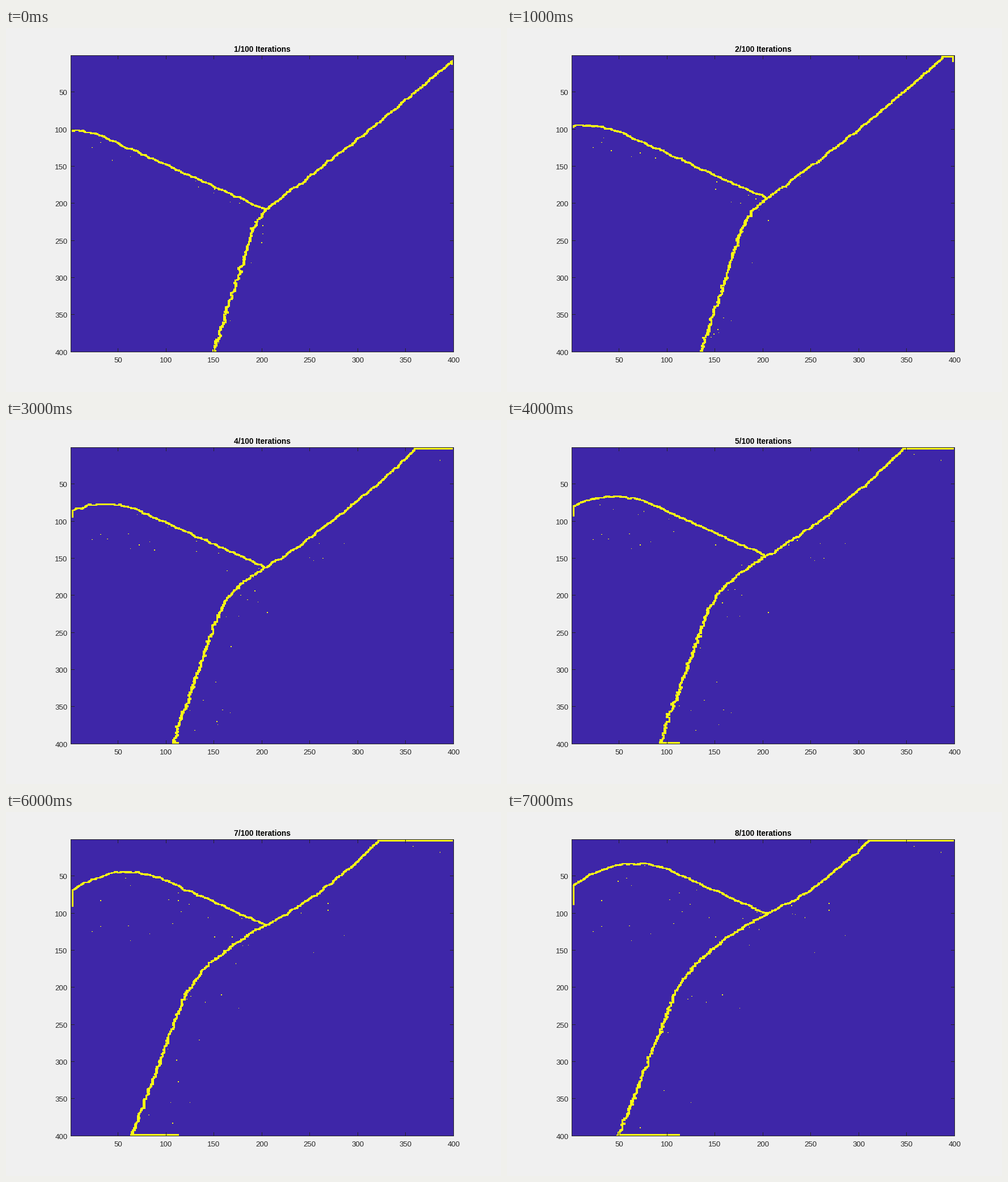
These frames come from a looping animation (873x641 px, 8000 ms). A matplotlib script:

```python
import numpy as np
import matplotlib.pyplot as plt
from matplotlib.animation import FuncAnimation
from matplotlib.colors import ListedColormap

W, H, DPI = 873, 641, 100
X0, X1, Y0, Y1 = 114, 790, 48, 571    # image area in pixels
N, STEPS = 400, 8
CW, CH = (X1 - X0) / N, (Y1 - Y0) / N
PX = X0 + (np.arange(N) + 0.5) * CW
PY = Y0 + (np.arange(N) + 0.5) * CH
INK = "#262626"

plt.rcParams["font.family"] = "Liberation Sans"

# Specks that stay for good: x, y and the iteration they appear in.
LASTING = [(168, 201, 1), (219, 226, 1), (216, 200, 3), (254, 215, 3),
           (596, 217, 3), (766, 71, 3), (294, 197, 5), (718, 60, 5)]


def col(x):
    return int(np.clip((x - X0) / CW, 0, N - 1))


def row(y):
    return int(np.clip((y - Y0) / CH, 0, N - 1))


def wobble(rng, amp, run):
    noise = rng.normal(size=N)
    return amp * np.convolve(noise, np.ones(run) / np.sqrt(run), "same")


def upper_edge(it, jx, jy, rng):
    """Height of the top grain's border in each column."""
    # Left arm: a straight slope that bends down near the rim.
    reach = 63 * np.sqrt(it)
    bend = np.maximum(0, reach - (PX - 117))
    left = jy - 0.45 * (jx - PX) + 0.0033 * bend ** 2

    # Right arm: slightly sagging, ending on the top rim.
    end = 823.4 - 26.86 * it + 0.476 * it ** 2
    s = np.clip((PX - jx) / (end - jx), 0, 1)
    sag = 13 * (1 - np.exp(-it / 2))
    right = jy + (50 - jy) * s + 4 * sag * s * (1 - s)

    arm = np.where(PX < jx, left + wobble(rng, 0.8, 5),
                   right + wobble(rng, 1.1, 5) * (s < 1))
    return np.maximum(arm, 50.6)


def lower_edge(it, jx, jy, rng):
    """Horizontal place of the border between the two lower grains."""
    foot = 391.5 - 24.3 * it
    slope = 0.31 + 0.011 * it
    bend = np.clip(1 - (PY - jy) / (20 + 16 * it), 0, 1) ** 2
    lift = jx - foot - slope * (569 - jy)
    x = foot + slope * (569 - PY) + lift * bend
    x += wobble(rng, 1.2, 5) + rng.normal(0, 1.1, N)
    return np.where(PY < jy, jx, x)


def outline(grain):
    """Cells with a different grain among their eight neighbours."""
    edge = np.zeros((N, N), bool)
    core = grain[1:-1, 1:-1]
    for dy in range(3):
        for dx in range(3):
            near = grain[dy:N - 2 + dy, dx:N - 2 + dx]
            edge[1:-1, 1:-1] |= near != core
    return edge


def shed(it, top, side, jy, rng):
    """New specks left behind the moving borders, with their last iteration."""
    specks = []
    for i in rng.integers(15, 290, 9):
        specks.append((PX[i], top[i] + 4 + rng.exponential(14)))
    for i in rng.integers(row(jy) + 12, N - 5, 6):
        specks.append((side[i] + 5 + rng.exponential(11), PY[i]))
    return [(x, y, it, it - 1 + rng.geometric(0.45)) for x, y in specks]


def build_all():
    rng = np.random.default_rng(12)
    specks = [(x, y, born, STEPS) for x, y, born in LASTING]
    grids = []
    for it in range(1, STEPS + 1):
        jx, jy = 457.5, 340 - 20.1 * it
        top = upper_edge(it, jx, jy, rng)
        side = lower_edge(it, jx, jy, rng)
        grain = np.where(PX[None] < side[:, None], 1, 2)
        grain[PY[:, None] < top[None]] = 0
        edge = outline(grain)

        # Strips left behind along the fixed rim.
        edge[row(top[2]):row(180 - 1.85 * it), 1:3] = True
        edge[row(top[-3]):row(72 - 6 * it), -3:-1] = True
        edge[-3:-1, col(side[-1]):col(306)] = True

        specks += shed(it, top, side, jy, rng)
        for x, y, born, last in specks:
            if born <= it <= last:
                edge[row(y), col(x)] = True
        grids.append(edge)
    return grids


fig = plt.figure(figsize=(W / DPI, H / DPI), dpi=DPI, facecolor="#f0f0f0")
ax = fig.add_axes([0, 0, 1, 1])
ax.axis("off")

grids = build_all()
image = ax.imshow(grids[0], cmap=ListedColormap(["#3e26a8", "#f9fb15"]),
                  vmin=0, vmax=1, extent=(X0, X1, Y1, Y0),
                  interpolation="nearest", aspect="auto")
ax.set_xlim(0, W)
ax.set_ylim(H, 0)


def line(xs, ys):
    ax.plot(xs, ys, color=INK, lw=0.72, snap=False,
            solid_capstyle="projecting", solid_joinstyle="miter")


def label(x, y, text, align):
    ax.text(x, y, text, size=9.5, color=INK, ha=align, va="baseline")


L, R, T, B = X0 + 0.5, X1 - 0.5, Y0 + 0.5, Y1 - 0.5
TICK = 6
for v in range(50, N + 1, 50):
    x = np.floor(X0 + (v - 0.5) * CW) + 0.5
    y = np.floor(Y0 + (v - 0.5) * CH) + 0.5
    for a, b in ((T, T + TICK), (B - TICK, B)):
        line([x, x], [a, b])
    for a, b in ((L, L + TICK), (R - TICK, R)):
        line([a, b], [y, y])
    label(x, 589, str(v), "center")
    label(108.5, y + 5.7, str(v), "right")
line([L, R, R, L, L], [T, T, B, B, T])

title = ax.text(452.3, 41.5, "", size=9.9, weight="bold", color="black",
                ha="center", va="baseline")


def draw(i):
    image.set_data(grids[i])
    title.set_text(f"{i + 1}/100 Iterations")
    return image, title


anim = FuncAnimation(fig, draw, frames=STEPS, interval=1000, repeat=True)
plt.show()
```
